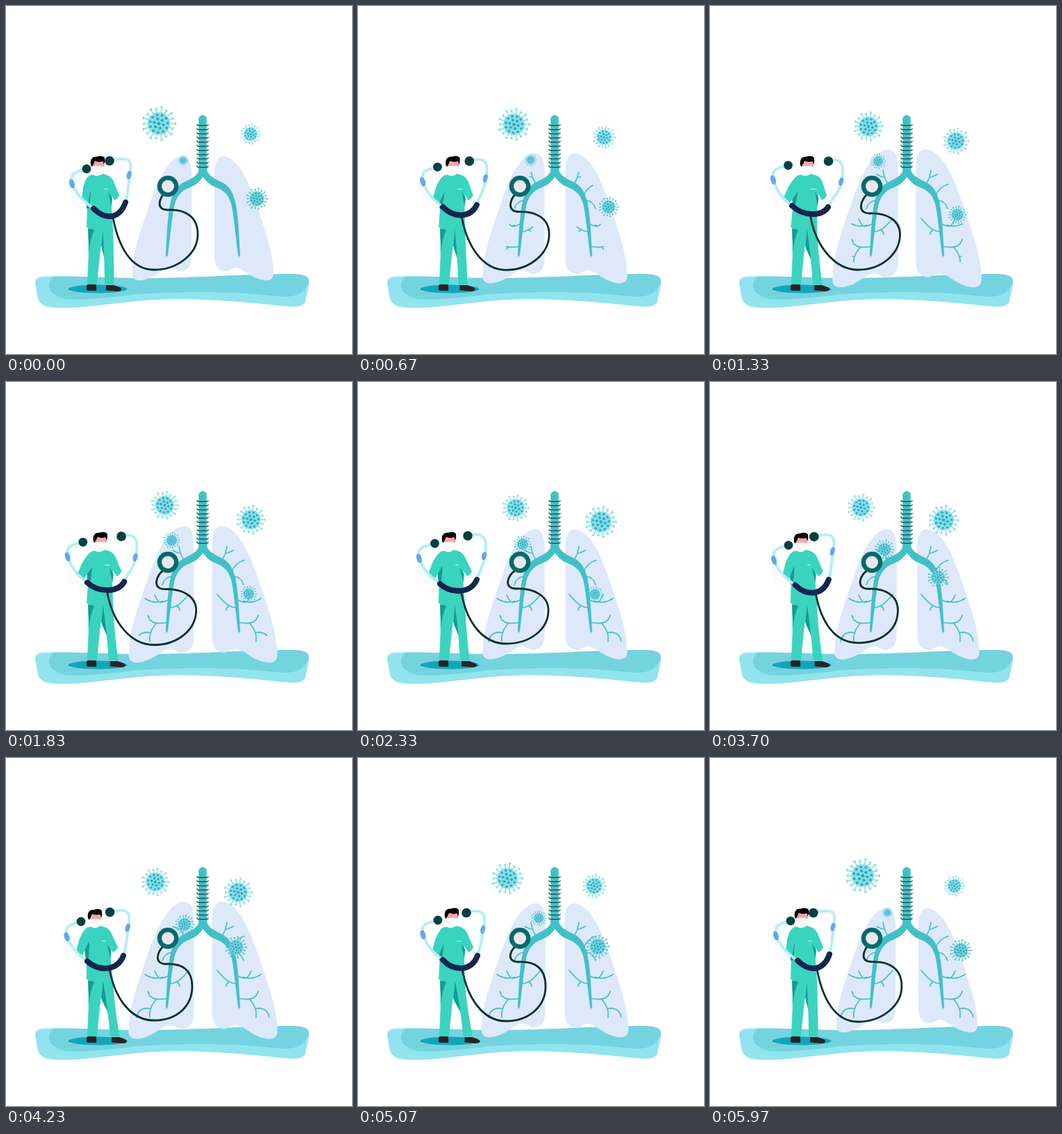
Recreate the animation shown at these times as an HTML page with a canvas. Size 498 by 500 pixels, loop 6.01 s.

```html
<!DOCTYPE html>
<html lang="en">
<head>
<meta charset="utf-8">
<title>Lung check-up</title>
<style>
html, body { margin: 0; width: 100%; height: 100%; overflow: hidden; background: #fff; }
canvas { display: block; width: 498px; height: 500px; }
</style>
</head>
<body>
<canvas id="stage"></canvas>
<script>
const W = 498, H = 500, LOOP = 6010, AXIS = 283.5;
const canvas = document.getElementById('stage');
const ctx = canvas.getContext('2d');
const dpr = window.devicePixelRatio || 1;
canvas.width = W * dpr;
canvas.height = H * dpr;

const C = {
  teal: '#43c0c5', lung: '#dde8fb', scrub: '#3ad3c0', fold: '#149c92',
  dark: '#063f42', cord: '#04302f', navy: '#14264f', rod: '#b4eff3',
  glove: '#62a6f7', skin: '#f7a5a5', sleeve: '#fbfbfd', shoe: '#2b2226',
  spot: '#2fa8b8'
};

// Periodic cubic track through six key poses.
const KEYS = [0, 1330, 2330, 3130, 4230, 5070];
const N = KEYS.length;
const wrap = i => (i + N) % N;
const keyTime = i => KEYS[wrap(i)] + Math.floor(i / N) * LOOP;
let now = 0;

function track(...v) {
  const val = i => v[wrap(i)];
  const slope = i => (val(i + 1) - val(i - 1)) / (keyTime(i + 1) - keyTime(i - 1));
  return () => {
    let i = N - 1;
    while (KEYS[i] > now) i--;
    const d = keyTime(i + 1) - keyTime(i), u = (now - keyTime(i)) / d;
    const u2 = u * u, u3 = u2 * u;
    return (2 * u3 - 3 * u2 + 1) * val(i) + (u3 - 2 * u2 + u) * d * slope(i)
      + (3 * u2 - 2 * u3) * val(i + 1) + (u3 - u2) * d * slope(i + 1);
  };
}

const pose = {
  headX: track(0, 8, -1, 3, -4, 3),
  headY: track(0, 0, 0, 0, 1.5, 0),
  handLX: track(95, 91, 88, 97, 87.5, 93.5),
  handLY: track(255.5, 250, 253.5, 254.5, 257, 254),
  handRX: track(177, 188.5, 181.5, 178.5, 175, 179.5),
  handRY: track(243, 252.5, 250, 244, 244, 246.5),
  earLX: track(116, 112.5, 110.5, 118.5, 108, 115),
  earLY: track(234, 229, 232, 233.5, 235, 233),
  earRX: track(149, 170.5, 158, 152, 149.5, 156),
  earRY: track(222.5, 223, 221, 223, 221.5, 222.5),
  elbowL: track(109, 105, 101, 108, 101, 107),
  elbowR: track(163, 168, 164, 165, 161, 166),
  yokeLX: track(126, 118, 118, 128, 117, 122),
  yokeLY: track(291, 287, 290, 291, 292, 290),
  yokeRX: track(172, 170, 171, 173, 169, 172),
  yokeRY: track(282, 289, 284, 284, 284, 284),
  yokeMid: track(302, 299, 300, 303, 302, 302),
  foot: track(142, 148, 147, 147, 150, 151.5),
  tubeEnd: track(154, 145, 149, 155, 149, 150),
  tubeL: track(221, 217, 215, 213, 218, 219),
  tubeDip: track(293, 298, 297, 298, 296, 293),
  tubeR: track(276, 273.5, 274, 273.5, 268, 270),
  tubeLow: track(379, 379, 376, 373, 377, 378)
};

const viruses = [
  { x: track(220, 228, 227, 221, 215, 215), y: track(169, 173, 181, 182, 178, 173),
    r: track(25, 21.5, 19.5, 19.5, 20.5, 23), spike: '#86dfe9', body: '#84deea' },
  { x: track(352, 354, 349.5, 341, 334, 340), y: track(184, 194, 201, 203, 193, 184),
    r: track(15, 19, 23, 23, 21, 17.5), spike: '#86dfe9', body: '#84deea' },
  { x: track(255, 242, 237, 244, 257, 260), y: track(222, 223, 233, 240, 239, 230),
    r: track(7.5, 11, 12.5, 14, 14, 11), spike: '#4fc6d2', body: '#70d2de' },
  { x: track(361, 356, 341, 329, 331, 345), y: track(277, 300, 305, 292, 272, 271),
    r: track(16, 13, 11.5, 14, 16, 17), spike: '#4fc6d2', body: '#70d2de' }
];

function fill(path, color) {
  ctx.fillStyle = color;
  ctx.fill(new Path2D(path));
}
function line(path, color, width) {
  ctx.strokeStyle = color;
  ctx.lineWidth = width;
  ctx.stroke(new Path2D(path));
}
function oval(x, y, rx, ry, color, turn = 0) {
  ctx.beginPath();
  ctx.ellipse(x, y, rx, ry, turn, 0, 7);
  ctx.fillStyle = color;
  ctx.fill();
}
function bothSides(draw) {
  draw();
  ctx.save();
  ctx.translate(2 * AXIS, 0);
  ctx.scale(-1, 1);
  draw();
  ctx.restore();
}

function ground() {
  fill('M42,399 Q42,388 56,388.5 C110,388 150,391 200,391 C270,391 330,386 405,385 '
    + 'Q438,384 436,399 L431,424 Q429,433 410,432 C340,425 255,416 180,425 '
    + 'C130,430 95,436 66,433 Q50,432 46,420 Z', '#91e4ee');
  fill('M68,388.5 C120,388 150,391 200,391 C270,391 330,386 405,385 Q436,384 436,394 '
    + 'C432,412 418,420 392,417 C330,410 260,409 190,414 C140,420 110,423 88,421 '
    + 'C64,418 55,402 68,388.5 Z', '#73d3df');
  oval(132, 406.5, 42.5, 6, '#11a6ba');
}

function lung() {
  const s = 1 + 0.115 * (1 - Math.cos(now / LOOP * 4 * Math.PI)) / 2;
  ctx.save();
  ctx.translate(224.5 - 9 * (s - 1), 305);
  ctx.scale(s, s);
  ctx.translate(-224.5, -305);
  fill('M253,216 C264,215 267,228 267,243 L267,358 C267,372 263,380 253,381 '
    + 'C247,382 242,376 236,376 C224,377 216,391 195,394 C184,395 181,390 182,380 '
    + 'C183,350 197,314 207,284 C217,256 231,219 253,216 Z', C.lung);
  ctx.restore();
}

const stems = 'M258,256 Q251,252 249,236 M242,272 Q236,259 224,256 '
  + 'M239,279 Q228,281 225,291 M236,312 C224,318 220,320 214,306 '
  + 'M234,325 C248,323 254,316 263,305 M233,345 Q208,351 204,335';
const twigs = 'M250,246 Q245,245 240,242 M226,315 Q212,319 200,311 '
  + 'M246,322 Q250,323 250,328 M216,347 Q205,359 207,373';
const tips = 'M208,360 Q191,357 188,373';

function grow(path, delay) {
  const len = (now - delay) * 0.03;
  if (len <= 0) return;
  ctx.setLineDash([len, 999]);
  line(path, C.teal, 1.7);
  ctx.setLineDash([]);
}

function airway() {
  bothSides(() => {
    grow(stems, 20);
    grow(twigs, 560);
    grow(tips, 1250);
  });
  bothSides(() => fill('M284,226 L277.5,226 L277.5,237 C272,249 258,250 249,258 '
    + 'C234,271 233,302 230,357 Q230,363 233,358 C237,326 239,302 242,288 '
    + 'C246,269 256,264 268,259 C276,256 280,250 284,245 Z', C.teal));
  line('M283,162.5 V238', C.teal, 11.5);
  for (let y = 171; y < 232; y += 6) {
    line(`M275,${y - 1} Q275,${y + 1} 279,${y + 0.6} H287 Q291,${y + 0.6} 291,${y - 0.6}`, '#0f4853', 1.4);
  }
}

function virus(v) {
  const r = v.r(), spikes = 18;
  ctx.save();
  ctx.translate(v.x(), v.y());
  ctx.scale(r, r);
  for (let i = 0; i < spikes; i++) {
    const a = i / spikes * 2 * Math.PI, far = i % 2 ? 0.86 : 0.95;
    const c = Math.cos(a), s = Math.sin(a);
    line(`M${c * 0.6},${s * 0.6} L${c * far},${s * far}`, v.spike, 0.065);
    oval(c * far, s * far, 0.055, 0.09, v.spike, a);
  }
  oval(0, 0, 0.65, 0.65, v.body);
  for (const [n, d, size] of [[1, 0, 0.1], [6, 0.27, 0.085], [11, 0.51, 0.075]]) {
    for (let i = 0; i < n; i++) {
      const a = i / n * 2 * Math.PI + d;
      oval(Math.cos(a) * d, Math.sin(a) * d, size, size, C.spot);
    }
  }
  ctx.restore();
}

function tube(p) {
  line(`M226,271 C${p.tubeL + 1},277 ${p.tubeL - 7},${p.tubeDip} ${p.tubeL + 13},${p.tubeDip} `
    + `C${p.tubeL + 36},${p.tubeDip - 1} ${p.tubeR},${p.tubeDip + 9} ${p.tubeR},328 `
    + `C${p.tubeR},356 247,${p.tubeLow} 213,${p.tubeLow} `
    + `C180,${p.tubeLow} ${p.tubeEnd + 8},346 ${p.tubeEnd},304`, C.cord, 2.8);
  oval(233, 259, 15.3, 15.3, '#056a6c');
  oval(233, 259, 9, 9, '#ebe7ec');
}

function legs(p) {
  const f = p.foot;
  fill('M116,402 Q117,399 122,399 H129 Q131,404 130,409 H117 Q115,407 116,402 Z', C.shoe);
  fill(`M${f + 2},401 H${f + 13} Q${f + 16},402 ${f + 21},404 Q${f + 25},406 ${f + 24},408 `
    + `Q${f + 22},410 ${f + 18},410 L${f + 2},408.5 Z`, C.shoe);
  fill(`M132,318 H146 L${f + 4},380 L138,348 Z`, C.fold);
  fill('M118,316 H140 L138,338 Q135,354 131,400 H116.5 Q120,360 118,316 Z', C.scrub);
  fill('M118,320 L127,321 Q121,334 119.5,352 Z', C.fold);
  fill(`M139,318 H154 Q155,350 ${f + 13.5},400 H${f} Q${(f + 139) / 2 + 1},350 139,318 Z`, C.scrub);
}

function torso(p) {
  const lean = p.headX * 0.8, el = p.elbowL, er = p.elbowR;
  const sl = 121 + lean, sr = 144 + lean;
  line(`M${el + 4},274 Q${el - 2},294 ${p.handLX + 4},285 L${p.handLX + 1},${p.handLY + 5}`, C.sleeve, 8);
  line(`M${er - 3},270 Q${er + 3},283 ${p.handRX - 3},268 L${p.handRX},${p.handRY + 4}`, C.sleeve, 7);

  ctx.save();
  const skew = -lean / 80;
  ctx.transform(1, 0, skew, 1, -skew * 320, 0);
  fill('M121,243 L139,241 Q149,243 152,254 L152,290 L154,320 Q136,323 116,318 '
    + 'L117,284 L115,262 Q116,246 121,243 Z', C.scrub);
  fill('M121,262 L122,268 L120,291 L116,291 L115,276 Z M147,267 L153,276 L152,288 Z', C.fold);
  fill('M125,238 H139 L139,241 Q132,247 125,242 Z', '#fff');
  line('M141,263 H148', '#d9f7f0', 1.2);
  ctx.restore();

  fill(`M${sl},243 Q${sl - 7},247 ${(sl + el) / 2 - 4},261 L${el},277 Q${el + 3},283 ${el + 9},284 `
    + `L${sl + 1},264 Z`, C.scrub);
  fill(`M${sr - 3},242 Q${sr + 7},243 ${sr + 11},252 L${er},272 Q${er - 2},277 ${er - 7},279 `
    + `L${sr + 3},265 Z`, C.scrub);
}

function head(p) {
  ctx.save();
  ctx.translate(p.headX, p.headY);
  fill('M124,222 Q132,217 141,222 L141,233 Q138,241 132,241 Q125,239 124,232 Z', C.skin);
  fill('M123,231 Q132,228 141.5,231 Q142,240 133,242 Q124,240 123,231 Z', '#fcfafc');
  fill('M122,229 Q120,216 131,216.5 Q138,214 142,218 Q143,223 141,228 L139.5,223 '
    + 'Q133,225 128,222.5 Q126,228 123.5,231 Z', '#050505');
  ctx.restore();
}

function headset(p) {
  const { handLX: lx, handLY: ly, handRX: rx, handRY: ry } = p;
  line(`M${p.yokeLX},${p.yokeLY} C${p.yokeLX - 14},${p.yokeLY - 10} ${lx + 4},${ly + 14} ${lx + 1},${ly} `
    + `C${lx - 4},${ly - 13} ${lx + 3},${p.earLY + 4} ${p.earLX - 3},${p.earLY + 1}`, C.rod, 4);
  line(`M${p.yokeRX},${p.yokeRY} C${p.yokeRX + 4},${p.yokeRY - 12} ${rx - 1},${ry + 15} ${rx + 1},${ry} `
    + `C${rx + 5},${ry - 22} ${rx + 2},${p.earRY - 6} ${p.earRX + 3},${p.earRY - 1}`, C.rod, 4);
  // Control height that puts the middle of the curve at yokeMid.
  const low = (p.yokeMid - (p.yokeLY + p.yokeRY) / 8) / 0.75;
  line(`M${p.yokeLX},${p.yokeLY} C${p.yokeLX + 16},${low} ${p.yokeRX - 9},${low} ${p.yokeRX},${p.yokeRY}`,
    C.navy, 8);
  oval(p.earLX, p.earLY, 6.4, 6.4, C.dark);
  oval(p.earRX, p.earRY, 6.8, 6.8, C.dark);
  oval(lx, ly, 3.6, 6.8, C.glove, -0.25);
  oval(lx - 1.5, ly - 3, 2.5, 3.2, C.glove);
  oval(rx, ry, 3.2, 6.2, C.glove, 0.2);
  oval(rx + 1.5, ry - 2.5, 2.4, 3, C.glove);
}

function draw(time) {
  now = time % LOOP;
  const p = {};
  for (const k in pose) p[k] = pose[k]();
  ctx.setTransform(dpr, 0, 0, dpr, 0, 0);
  ctx.fillStyle = '#fff';
  ctx.fillRect(0, 0, W, H);
  ctx.lineCap = ctx.lineJoin = 'round';
  ground();
  bothSides(lung);
  airway();
  viruses.forEach(virus);
  legs(p);
  torso(p);
  head(p);
  tube(p);
  headset(p);
}

const start = performance.now();
function tick() {
  draw(performance.now() - start);
  requestAnimationFrame(tick);
}
tick();
</script>
</body>
</html>
```
